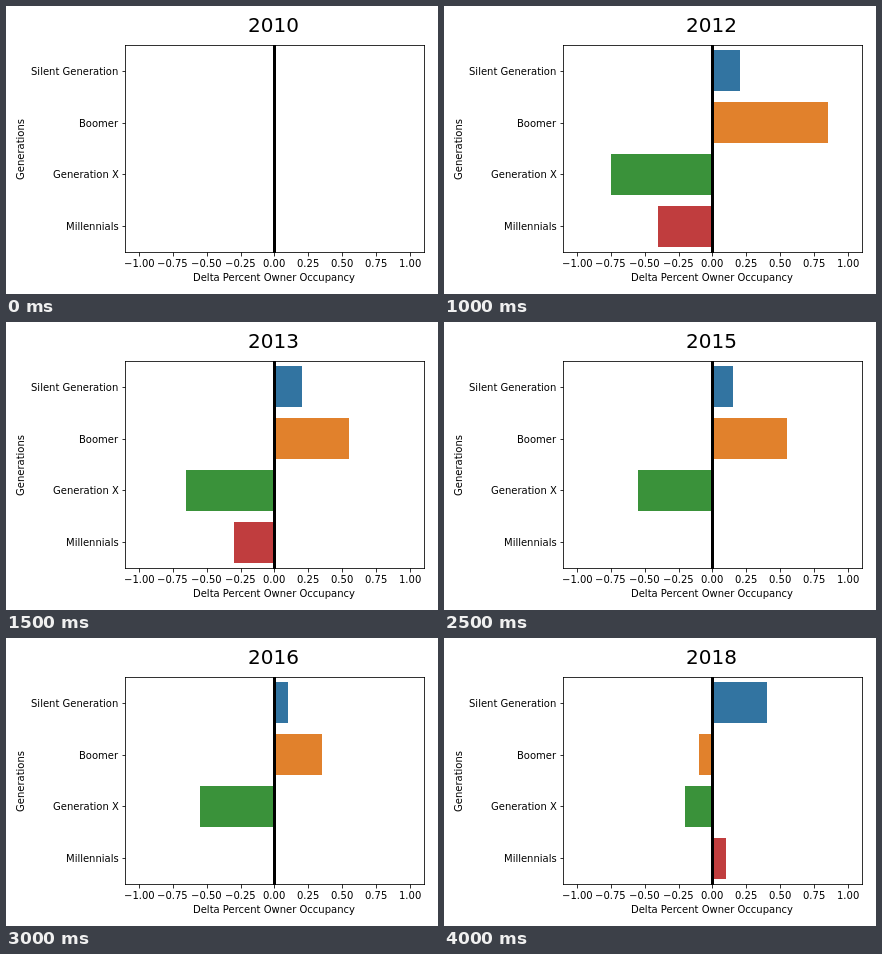
These frames come from a looping animation (432 px wide and 288 px high, 4500 ms). An HTML page with a canvas:

```html
<!DOCTYPE html>
<html lang="en">
<head>
<meta charset="utf-8">
<title>Owner occupancy by generation</title>
<style>
  html, body { margin: 0; width: 100%; height: 100%; overflow: hidden; background: #fff; }
  canvas { display: block; }
</style>
</head>
<body>
<canvas id="chart" width="432" height="288"></canvas>
<script>
const ctx = document.getElementById('chart').getContext('2d');
const STEP = 500, YEARS = 9, FIRST_YEAR = 2010;
const LEFT = 119.5, RIGHT = 418.5, TOP = 39.5, BOTTOM = 246.5;
const ZERO = 268.4, UNIT = 135.5, BAND = 51.75;

// Turning points of each trend: [years since the start, value].
const groups = [
  { name: 'Silent Generation', color: '#3274a1',
    keys: [[1, 0.3], [2, 0.2], [4, 0.2], [6, 0.1], [8, 0.4]] },
  { name: 'Boomer', color: '#e1812c',
    keys: [[1, 1], [2, 0.85], [3, 0.55], [4, 0.6], [5, 0.55], [8, -0.1]] },
  { name: 'Generation X', color: '#3a923a',
    keys: [[1, -0.8], [4, -0.6], [6, -0.55], [7, -0.3], [8, -0.2]] },
  { name: 'Millennials', color: '#c03d3e',
    keys: [[1, -0.5], [4, -0.2], [5, 0], [6, 0], [8, 0.1]] }
];

const pixelX = v => Math.round(ZERO + v * UNIT);

// Linear between turning points, in steps of 0.05; nothing before the first.
function valueAt(keys, year) {
  if (year < keys[0][0]) return 0;
  const i = keys.findIndex(k => k[0] >= year);
  const [t1, v1] = keys[i], [t0, v0] = keys[Math.max(0, i - 1)];
  const part = t1 === t0 ? 0 : (year - t0) / (t1 - t0);
  const v = t1 === t0 ? v1 : v0 + (v1 - v0) * part;
  return Math.round(v * 20) / 20;
}

// Text starts on a whole pixel; anchor is 0.5 for centred, 1 for right-aligned.
function text(str, x, y, anchor = 0.5, size = 10) {
  ctx.font = size + 'px "DejaVu Sans", sans-serif';
  ctx.fillStyle = '#000';
  ctx.fillText(str, Math.round(x - ctx.measureText(str).width * anchor), y);
}

function line(x1, y1, x2, y2, cap = 'butt') {
  ctx.lineCap = cap;
  ctx.beginPath();
  ctx.moveTo(x1, y1);
  ctx.lineTo(x2, y2);
  ctx.stroke();
}

function drawBars(year) {
  groups.forEach((g, i) => {
    const zero = pixelX(0), end = pixelX(valueAt(g.keys, year));
    ctx.fillStyle = g.color;
    ctx.fillRect(Math.min(zero, end), 44 + 52 * i, Math.abs(end - zero), 41);
  });
}

function drawAxes() {
  ctx.fillStyle = '#000';
  ctx.fillRect(267, TOP - 0.5, 3, BOTTOM - TOP + 1);
  ctx.strokeStyle = 'rgba(0, 0, 0, 0.8)';
  ctx.lineWidth = 1;

  for (let i = -4; i <= 4; i++) {
    const v = i / 4, x = pixelX(v) + 0.5;
    line(x, BOTTOM, x, BOTTOM + 4);
    text((v < 0 ? '\u2212' : '') + Math.abs(v).toFixed(2), ZERO + v * UNIT, 261);
  }
  groups.forEach((g, i) => {
    const y = Math.round(64.9 + BAND * i);
    line(LEFT - 3, y + 0.5, LEFT, y + 0.5);
    text(g.name, 112.4, y + 4, 1);
  });
  for (const x of [LEFT, RIGHT]) line(x, TOP, x, BOTTOM, 'square');
  for (const y of [TOP, BOTTOM]) line(LEFT, y, RIGHT, y, 'square');

  text('Delta Percent Owner Occupancy', ZERO, 275);
  ctx.save();
  ctx.translate(18, 144);
  ctx.rotate(-Math.PI / 2);
  text('Generations', 0, 0);
  ctx.restore();
}

function draw(year) {
  ctx.fillStyle = '#fff';
  ctx.fillRect(0, 0, 432, 288);
  drawBars(year);
  drawAxes();
  text(String(FIRST_YEAR + year), 267.5, 26, 0.5, 20);
}

const start = performance.now();
function tick() {
  const elapsed = Math.max(0, performance.now() - start);
  draw(Math.floor(elapsed / STEP) % YEARS);
  requestAnimationFrame(tick);
}
tick();
</script>
</body>
</html>
```
